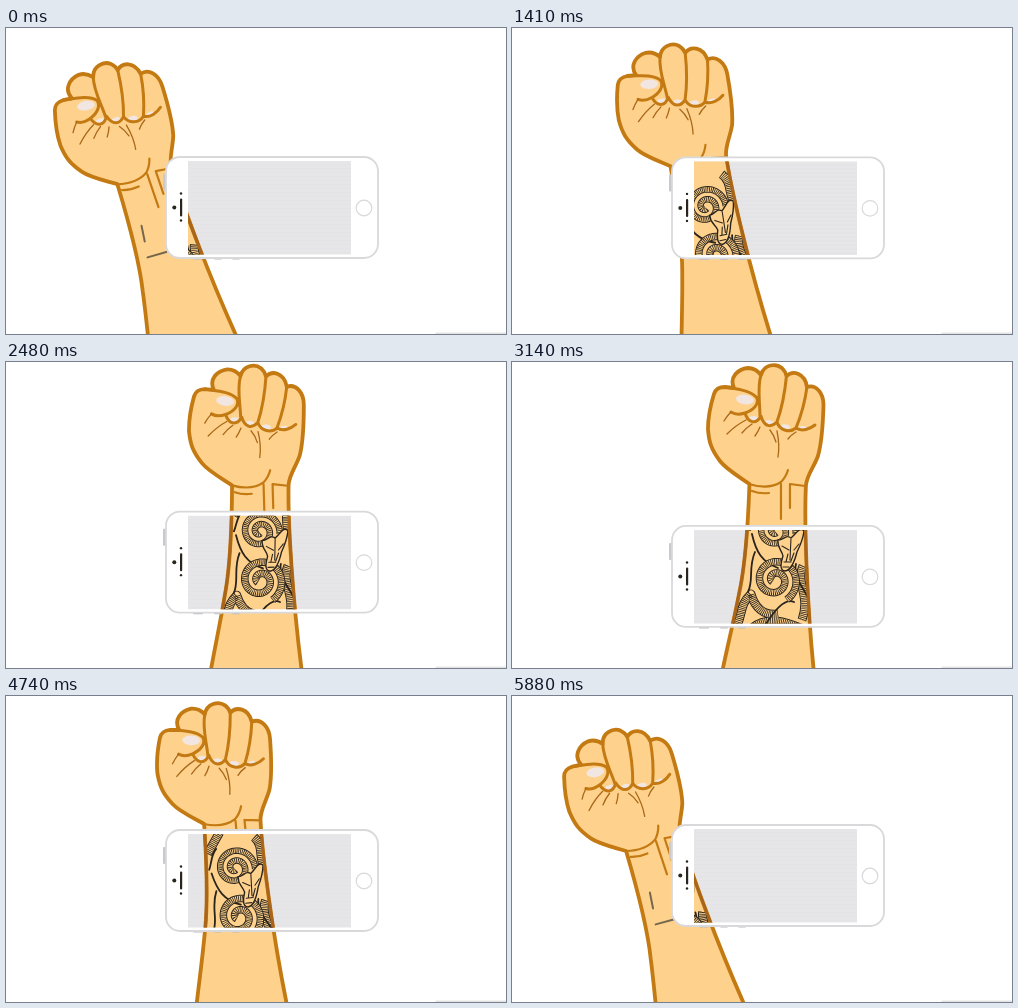
Animation, 500 px wide and 306 px high, one loop 5.94 s. Source, as an HTML page with a canvas:

```html
<!DOCTYPE html>
<html>
<head>
<meta charset="utf-8">
<style>
html, body { margin: 0; width: 100%; height: 100%; overflow: hidden; background: #fff; }
canvas { display: block; width: 500px; height: 306px; }
</style>
</head>
<body>
<canvas id="stage"></canvas>
<script>
const LOOP = 5940, STEPS = 89;
const SKIN = '#fed18c', EDGE = '#c47a12', INK = '#2a241c', GREY = '#d9d9dc';
const canvas = document.getElementById('stage');
const dpr = window.devicePixelRatio || 1;
canvas.width = 500 * dpr;
canvas.height = 306 * dpr;
const c = canvas.getContext('2d');

// [time, value] keys joined by a smooth periodic curve
const tilt = [[0, 18.75], [220, 21], [420, 21.8], [610, 20.8], [870, 18.6], [1210, 13.9],
  [1810, 6.7], [1940, 5.3], [2500, 1.5], [3140, 0], [3500, 0], [4010, .9], [4740, 5.7],
  [5410, 12.9], [5880, 18.4]];
const drop = [[0, 0], [1300, 0], [1940, 6], [2560, 23], [3140, 35], [3320, 35.6],
  [4010, 23], [4740, 5], [5420, 0], [5700, 0]];

function sample(keys, t) {
  const n = keys.length;
  const key = i => {
    const k = keys[(i + n) % n];
    return [k[0] + LOOP * Math.floor(i / n), k[1]];
  };
  let i = n - 1;
  while (keys[i][0] > t) i--;
  const [a, b, d, e] = [key(i - 1), key(i), key(i + 1), key(i + 2)];
  const h = d[0] - b[0], u = (t - b[0]) / h;
  const m0 = (d[1] - a[1]) / (d[0] - a[0]) * h;
  const m1 = (e[1] - b[1]) / (e[0] - b[0]) * h;
  return b[1] + u * (m0 + u * (3 * (d[1] - b[1]) - 2 * m0 - m1 + u * (m0 + m1 - 2 * (d[1] - b[1]))));
}

const path = d => new Path2D(d);

const arm = path('M193 400L201 350L211 306C216 282 222 258 227 232C233 205 236 165 237.5 122' +
  'C226 114 214 107 208 99C199 87 197 80 196 67C196 55 198 45 202 32C204 26 208 25 213 25L222 26' +
  'C217 15 226 7 236 6C242 6 246 9 249 13C252 2 264 1 270 6C273 9 274 11 274.5 14' +
  'C281 8 293 11 295 25C304 22 312 31 311.5 44C311 62 310 80 306 94C302 105 295 113 294 123' +
  'C292 160 295 240 301.5 306L306 350L310 400');
const fingers = path('M213 25C223 27 239 28 245 36C247 42 242 48 233 51C227 53 222 52 219 50' +
  'M249 13C245 26 248 40 248 54M274.5 14C273 30 270 46 265 60M295 25C293 40 289 54 284 66' +
  'M233 51C236 61 244 63 249 54C252 65 259 66 265 60C268 69 278 71 284 66C290 70 298 67 303 63');
const creases = path('M219 50Q215 54 212 59M234 58Q224 63 215 72M240 62Q234 66 230 71' +
  'M248 65Q246 70 243 74M258 68Q262 73 264 80M265 69Q268 83 266 95M284 70Q279 73 276 77');
const wrist = path('M237 122Q257 128 269 120Q274 115 276 108M269 122L269 157M278 122L278 146' +
  'M278 122L293 124M240 129Q248 132 257 131');
const marks = path('M247 169L245 185M242.5 201L262 202');

function spiral(x, y, r0, r1, from, turns) {
  const p = new Path2D();
  for (let i = 0; i <= 80; i++) {
    const u = i / 80, a = from + u * turns * 2 * Math.PI, r = r0 + (r1 - r0) * u;
    p.lineTo(x + r * Math.cos(a), y + r * Math.sin(a));
  }
  return p;
}

const horn = spiral(264, 169, 2, 20, 1.4, 1.8);
const curl = spiral(263, 218, 3, 23, 2.6, 1.75);
const ribbons = path('M221 272C232 254 226 244 239 232C243 246 252 254 266 252' +
  'M291 204C283 220 299 234 290 258M240 266C258 252 278 262 299 270' +
  'M238 152L252 132M286 140C295 150 288 160 293 172M222 284C244 270 262 288 298 284');
const strands = path('M240 172C244 190 250 200 266 206M243 190C236 206 242 218 236 230' +
  'M284 202C281 216 292 226 296 236M247 148C241 154 241 162 238 168M282 240C274 236 264 246 254 262');
const face = path('M266 178C272 178 274 172 279 176C284 172 288 164 292 169C291 178 288 184 285 190' +
  'C283 198 280 208 273 209C267 208 269 200 271 194C270 188 265 186 266 178Z');
const features = path('M270 184L277 188M287 182L282 188M279 177L278 198M272 200L279 200M271 205L277 205' +
  'M276 192L274 200M282 191L279 199');

function line(p, color, width, dash = []) {
  c.strokeStyle = color;
  c.lineWidth = width;
  c.setLineDash(dash);
  c.stroke(p);
  c.setLineDash([]);
}

// Dark-edged strip filled with hatching
function band(p, w) {
  c.lineCap = 'butt';
  line(p, INK, w + 2);
  line(p, SKIN, w);
  line(p, INK, w, [.8, 1]);
  c.lineCap = 'round';
}

function limb() {
  c.fillStyle = SKIN;
  c.fill(arm);
  line(arm, EDGE, 3.8);
}

function nail(x, y, rx, ry, turn) {
  c.fillStyle = '#f1e6e2';
  c.beginPath();
  c.ellipse(x, y, rx, ry, turn, 0, 7);
  c.fill();
}

function hand() {
  limb();
  nail(233, 37.5, 9, 4.8, .15);
  nail(242, 57, 5, 3, .1);
  nail(257, 61, 5, 3, .1);
  nail(273, 65, 5, 2.8, .1);
  nail(291, 66, 4, 2, -.1);
  line(fingers, EDGE, 3);
  line(creases, '#a9681a', 1.3);
  line(wrist, EDGE, 2.2);
  line(marks, '#75664c', 2);
}

function tattoo() {
  c.save();
  c.clip(arm);
  band(ribbons, 7);
  line(strands, INK, 1.8);
  band(curl, 5.5);
  band(horn, 4.5);
  c.fillStyle = SKIN;
  c.fill(face);
  line(face, INK, 1.4);
  line(features, INK, 1.1);
  c.restore();
  line(arm, '#a9651a', 3);
}

function box(x, y, w, h, r, fill) {
  c.beginPath();
  c.roundRect(x, y, w, h, r);
  c.fillStyle = fill;
  c.fill();
}

function dot(x, y, r) {
  c.beginPath();
  c.arc(x, y, r, 0, 7);
}

function phone() {
  box(157, 17, 4, 17, 1, '#c9c9cd');
  for (const x of [187, 208, 226]) box(x, 99, x < 200 ? 10 : 8, 3.5, 1, '#b9b9be');
  box(160, 0, 212, 101, 14, '#fff');
  c.strokeStyle = GREY;
  c.lineWidth = 1.8;
  c.stroke();
  c.fillStyle = INK;
  for (const [x, y, r] of [[168.3, 50.5, 2], [175, 36.5, 1.2], [175, 63.5, 1.2]]) {
    dot(x, y, r);
    c.fill();
  }
  box(174, 41.5, 2.2, 18, 1, INK);
  dot(358, 51, 7.8);
  c.strokeStyle = GREY;
  c.lineWidth = 1.2;
  c.stroke();
  box(182, 4, 163, 93.5, 0, '#e6e5e7');
  for (let y = 7; y < 97; y += 4) box(182, y, 163, 1, 0, '#e4e3e6');
}

function pose(angle) {
  c.translate(278, 521);
  c.rotate(-angle * Math.PI / 180);
  c.translate(-278, -521);
}

function draw(now) {
  const step = Math.floor(now % LOOP / LOOP * STEPS + .05) % STEPS;
  const t = step * LOOP / STEPS;
  const angle = sample(tilt, t), y = 129 + Math.max(0, sample(drop, t));
  c.setTransform(dpr, 0, 0, dpr, 0, 0);
  c.lineCap = c.lineJoin = 'round';
  c.fillStyle = '#fff';
  c.fillRect(0, 0, 500, 306);
  box(429, 304.5, 80, 6, 2, '#e3e3e3');

  c.save();
  pose(angle);
  hand();
  c.restore();

  c.save();
  c.translate(0, y);
  phone();
  c.restore();

  c.save();
  c.beginPath();
  c.rect(182, y + 4, 163, 93.5);
  c.clip();
  pose(angle);
  limb();
  tattoo();
  c.restore();
}

const start = performance.now();
function tick() {
  draw(performance.now() - start);
  requestAnimationFrame(tick);
}
tick();
</script>
</body>
</html>
```
